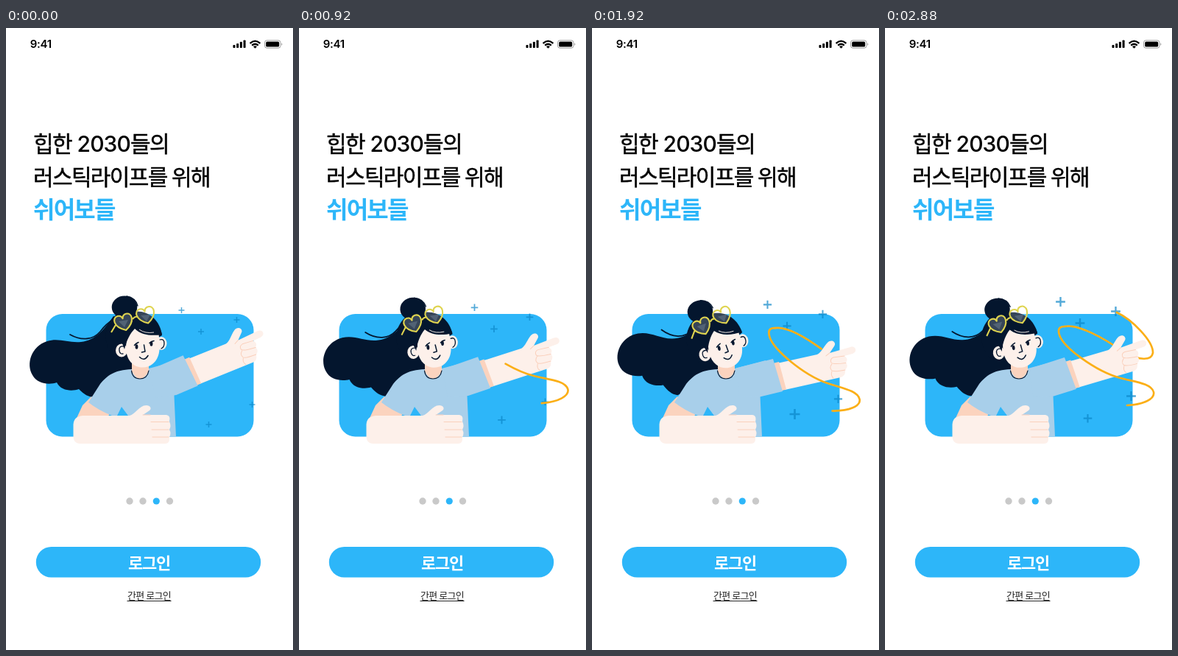
These frames come from a looping animation (390 px wide and 844 px high, 2.92 s). An HTML page:

```html
<!DOCTYPE html>
<html lang="ko">
<head>
<meta charset="utf-8">
<title>Onboarding</title>
<style>
  html, body { margin: 0; height: 100%; overflow: hidden; background: #fff; }
  svg { display: block; width: 100%; height: 100%; font-family: Inter, "Noto Sans CJK KR", "Noto Sans CJK", sans-serif; }
  .blue { fill: #2db6f9; }
  .hair { fill: #04162e; }
  .shirt { fill: #a8cfea; }
  .skin { fill: #fdf0ea; }
  .shade { fill: #fbd3be; }
  .ink { fill: none; stroke: #04162e; stroke-linecap: round; stroke-linejoin: round; }
  .crease { fill: none; stroke: #fad0bc; stroke-linecap: round; }
  .trail { fill: none; stroke: #fbaf17; stroke-width: 2.7; stroke-linecap: round; }
  .spark { stroke: #0b86c8; stroke-width: 1.5; opacity: .7; }
  .rim { fill: #fff3; stroke: #dfd44f; stroke-width: 2.1; stroke-linejoin: round; }
</style>
</head>
<body>
<svg viewBox="0 0 390 844">
  <defs>
    <path id="heart" d="M0 11.5C-16 3-14-10-6-10Q-1-10 0-5Q1-10 6-10C14-10 16 3 0 11.5Z"/>
  </defs>

  <!-- Status bar -->
  <text x="32.8" y="27" font-size="15" font-weight="600" letter-spacing="-.3">9:41</text>
  <g>
    <rect x="308.5" y="23" width="3" height="4" rx=".8"/>
    <rect x="313.2" y="21" width="3" height="6" rx=".8"/>
    <rect x="317.9" y="18.7" width="3" height="8.3" rx=".8"/>
    <rect x="322.6" y="16.5" width="3" height="10.5" rx=".8"/>
    <g fill="none" stroke="#000" stroke-width="2.3">
      <path d="M331.6 20.8Q338.5 14.4 345.4 20.8"/>
      <path d="M334.2 23.7Q338.5 19.8 342.8 23.7"/>
    </g>
    <path d="M336 25.3Q338.5 23.3 341 25.3L338.5 27.8Z"/>
    <rect x="351.5" y="16.8" width="21.5" height="10.4" rx="3" fill="none" stroke="#000" stroke-opacity=".38"/>
    <rect x="353.2" y="18.5" width="18" height="7" rx="1.6"/>
    <path d="M374.3 20.2Q376.6 22 374.3 23.8Z" opacity=".4"/>
  </g>

  <!-- Headline; the thin stroke gives the Korean letters a medium weight -->
  <g font-size="30" font-weight="500" letter-spacing="-1.65" stroke="#000" stroke-width=".5">
    <text x="37" y="167.5">힙한 <tspan dx="1.3" letter-spacing="-.9" stroke="none">2030</tspan>들의</text>
    <text x="37" y="212.5">러스틱라이프를 위해</text>
    <text x="37" y="257.5" class="blue" font-size="32" font-weight="700" letter-spacing="-1.8" stroke="none">쉬어보들</text>
  </g>

  <!-- Illustration -->
  <rect class="blue" x="54.5" y="388" width="282" height="166.5" rx="22"/>
  <g id="sparks"></g>

  <g id="mane">
    <path class="hair" d="M146 391C134 408 122 424 102 426C86 428 72 420 56 425C34 432 27 456 36 471C43 484 60 484 69 481C75 493 90 493 99 490C106 497 112 501 120 501L172 470L168 400Z"/>
    <path class="ink" stroke-width="1.8" d="M87 416C103 425 119 423 128 412Q136 401 147 395"/>
  </g>

  <path class="shade" d="M116 500L104 512L92 538L130 540L142 522Z"/>
  <path class="shirt" d="M171 463C147 464 137 472 128 483L112 508Q126 519 144 526L151 526L157 514L166 526L170 554.5H231L228.5 499L236 451L194 462Z"/>

  <path id="trailBack" class="trail" pathLength="1440" d="M244 405C262 401 298 421 325 440C345 451 362 452 364 441C365 425 335 395 315 386"/>
  <g id="arm">
    <path class="skin" d="M252 455L306 443C312 440 315 432 320 427C326 421 333 427 329 432L323 441L351 433C359 431 361 440 354 442L343 445Q349 449 345 454Q349 460 344 464Q345 472 338 474L262 491Z"/>
    <path class="shade" d="M246 455L254 453L264 490.5L258 492Z"/>
    <path class="shirt" d="M196 461.5L246 449L259 493L228 500.5L200 500Z"/>
    <path class="crease" d="M323 441L318 445M343 445L328 447Q323 449 325 454Q327 457 345 454.5M326 456Q322 461 326 465Q330 467 344 464M326 466Q324 472 328 475"/>
  </g>
  <path id="trailFront" class="trail" pathLength="1440" d="M329 512C352 511 367 503 365 494C362 482 338 480 320 475C290 467 236 432 236 411Q236 405 244 405"/>

  <path class="shade" d="M171 450V466Q182 486 194 466V450Z"/>
  <path class="ink" stroke-width="1.2" d="M170.5 465Q172 476 182 476Q192 476 194 465"/>

  <g id="head">
    <ellipse class="hair" cx="161" cy="378.8" rx="17.3" ry="15.3"/>
    <path class="ink" stroke-width="1.3" d="M164 364Q176 366 179 377M170 366Q176 371 175 384"/>
    <path class="hair" d="M150 389C133 403 130 425 146 446L165 444L200 424L212 417C209 395 192 382 172 385Z"/>
    <ellipse class="skin" cx="157" cy="437.5" rx="8" ry="9"/>
    <ellipse class="skin" cx="211" cy="428" rx="7.5" ry="9"/>
    <path class="ink" stroke-width="1.3" d="M160 432Q153 431 154 438Q155 443 159 442M209 423Q215 421 215 428Q215 433 211 435"/>
    <path class="skin" d="M163 436C163 419 167 408 174 406L207 412C210 433 210 447 199 456C188 465 165 462 163 436Z"/>
    <path class="hair" d="M161 436C164 423 169 414 175 408C184 417 198 418 212 416C207 394 190 386 172 392L152 412Z"/>
    <path d="M181 409Q189 415 201 413" fill="none" stroke="#fdf0ea" stroke-width=".9"/>
    <ellipse class="hair" cx="177.5" cy="432.5" rx="1.9" ry="3.3"/>
    <ellipse class="hair" cx="197.5" cy="428.5" rx="1.9" ry="3.3"/>
    <path class="ink" stroke-width="1.5" d="M174.5 430.5Q176.5 428 180 426.5M195 427.5Q197.5 425 201 424.5M187.500 430L189 439L184.500 440M181.500 446.500Q188 453 193 444.500"/>
    <g class="rim">
      <path d="M149 403L143 413M172 395Q175 391 178 392" fill="none"/>
      <use href="#heart" transform="translate(160 399) rotate(-16)"/>
      <use href="#heart" transform="translate(190 389.500) rotate(-16)"/>
    </g>
    <path d="M153 398L166 396L161 406Z M183 390L196 389L191 398Z" fill="#7b8ca0" opacity=".4"/>
  </g>

  <path class="skin" d="M104 526H168C175 524 179 516 187 512.5C195 510 199 516 195 519L186 525H218Q224 526 222 534Q225 540 222 545Q225 550 222 555Q223 564 216 564H101Q91 564 91.5 552V538Q92 527 104 526Z"/>
  <path class="crease" d="M197 534.5H221M198 545H221M199 555H221M186 525H196"/>

  <!-- Pager and buttons -->
  <g fill="#c9c9c9">
    <circle cx="168" cy="642" r="4.7"/>
    <circle cx="186" cy="642" r="4.7"/>
    <circle class="blue" cx="204.3" cy="642" r="4.6"/>
    <circle cx="222.5" cy="642" r="4.7"/>
  </g>
  <rect class="blue" x="40.8" y="704" width="305.4" height="41.5" rx="20.75"/>
  <text x="166" y="733.5" font-size="22" font-weight="700" letter-spacing="-1.2" fill="#fff">로그인</text>
  <text x="165" y="774.7" font-size="13" letter-spacing="-.75" fill="#222">간편 로그인</text>
  <path d="M164.5 777.5H224.5" stroke="#222"/>
</svg>
<script>
  const LOOP = 2920, STEP = 40, SWING = 9.4, HALF = 1440;
  const $ = id => document.getElementById(id);

  // The last sparkle sways with the body; the others drift upwards.
  const sparks = [[238.5, 383], [313.5, 396], [265, 412], [334.5, 511], [275.5, 538]].map(([x, y], i) => {
    const el = document.createElementNS("http://www.w3.org/2000/svg", "path");
    el.setAttribute("class", "spark");
    el.setAttribute("d", "M-4 0H4M0-4V4");
    $("sparks").append(el);
    return { el, x, y, sways: i === 4 };
  });

  const turn = (id, angle, x, y) => $(id).setAttribute("transform", `rotate(${angle} ${x} ${y})`);

  function reveal(id, amount) {
    const shown = Math.max(0, Math.min(HALF, amount));
    const el = $(id);
    el.setAttribute("stroke-dasharray", `${shown} 9999`);
    el.setAttribute("visibility", shown ? "visible" : "hidden");
  }

  function draw(t) {
    const sway = (1 - Math.cos(Math.PI * t / 2000)) / 2;
    const drift = t / 2880;

    turn("mane", 7.5 * sway, 140, 470);
    turn("head", -10.3 * sway, 187, 460);
    turn("arm", SWING * (sway - 1), 214, 479);
    for (const id of ["trailFront", "trailBack"]) turn(id, SWING * (sway - .594), 214, 479);
    reveal("trailFront", t);
    reveal("trailBack", t - HALF);

    for (const { el, x, y, sways } of sparks) {
      const rise = sways ? 14 * sway : 11.5 * drift;
      const size = 1 + (sways ? .75 * sway : .6 * drift);
      el.setAttribute("transform", `translate(${x} ${y - rise}) scale(${size})`);
    }
  }

  const start = performance.now();
  function tick() {
    const t = (performance.now() - start) % LOOP;
    draw(Math.floor(t / STEP) * STEP);
    requestAnimationFrame(tick);
  }
  tick();
</script>
</body>
</html>
```
